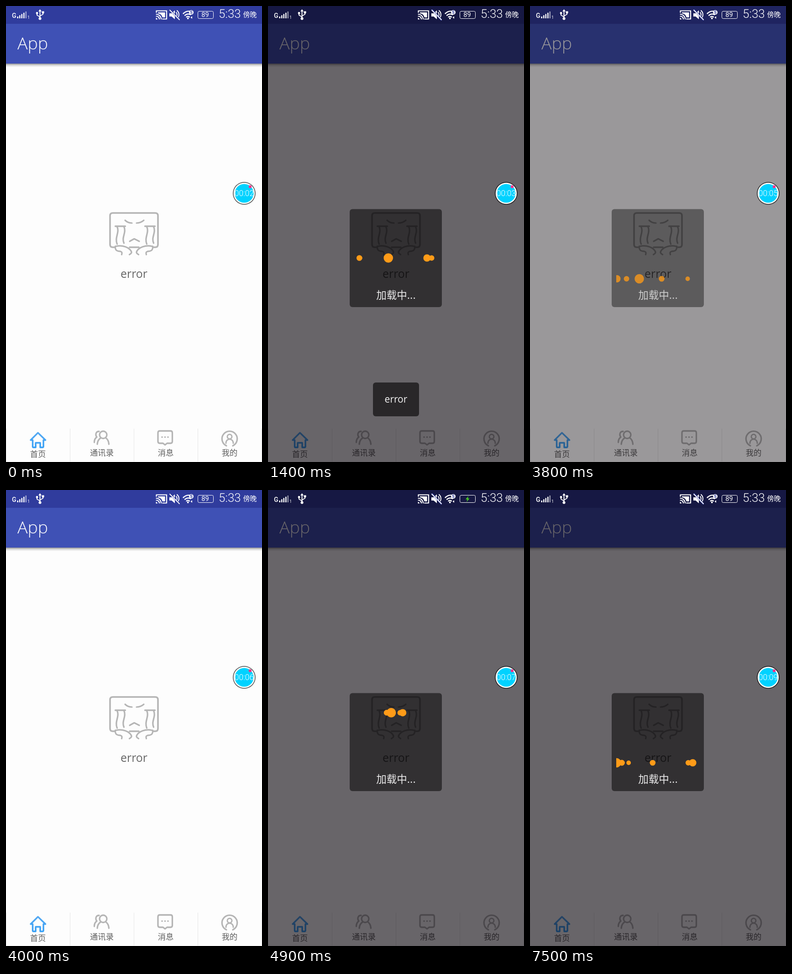
Write an HTML page with a canvas that moves like this. It is 561x998 px and loops after 7600 ms.

```html
<!DOCTYPE html>
<html lang="zh">
<head>
<meta charset="utf-8">
<title>App</title>
<style>
html, body { margin: 0; width: 100%; height: 100%; overflow: hidden; background: #fdfdfd; }
canvas { display: block; width: 561px; height: 998px; }
</style>
</head>
<body>
<canvas id="stage" width="561" height="998"></canvas>
<script>
const ctx = document.getElementById('stage').getContext('2d');
const LOOP = 7600, STEP = 100, CENTER = 280.5;
const LATIN = '"Open Sans", sans-serif';
const DIGITS = 'Roboto, sans-serif';
const CJK = '"Noto Sans CJK SC", "Noto Sans CJK", sans-serif';
const GREY = '#b5b5b5';

// Two loads run through the same phases; only the ball speeds (px/s) differ.
const LOADS = [
  { start: 130, speeds: [-14, 93, -64, 85, -83, -14] },
  { start: 4530, speeds: [-31, 37, -58, 22, -22, -27] }
];
const RADII = [10.3, 8, 6.3, 6, 4.9, 6.5];
const SEARCH_END = 370, FADE_IN = 270, DISMISSED = 3870, FALL = 2900;

const clamp = v => Math.max(0, Math.min(1, v));
const ramp = (t, from, to) => clamp((t - from) / (to - from));

function bounce(x, lo, hi) {
  const w = hi - lo, p = (((x - lo) % (2 * w)) + 2 * w) % (2 * w);
  return lo + (p > w ? 2 * w - p : p);
}

function rect(x, y, w, h, color, r = 0) {
  ctx.fillStyle = color;
  ctx.beginPath();
  ctx.roundRect(x, y, w, h, r);
  ctx.fill();
}

function disc(x, y, r, color) {
  ctx.fillStyle = color;
  ctx.beginPath();
  ctx.arc(x, y, r, 0, 7);
  ctx.fill();
}

function line(d, color, width = 3.3) {
  ctx.strokeStyle = color;
  ctx.lineWidth = width;
  ctx.lineCap = ctx.lineJoin = 'round';
  ctx.stroke(new Path2D(d));
}

function shape(d, color) {
  ctx.fillStyle = color;
  ctx.fill(new Path2D(d));
}

function text(s, x, y, font, color, align = 'center') {
  ctx.font = font;
  ctx.fillStyle = color;
  ctx.textAlign = align;
  ctx.fillText(s, x, y);
}

function layer(x, scaleX, alpha, paint) {
  ctx.save();
  ctx.globalAlpha = alpha;
  ctx.translate(x, 0);
  ctx.scale(scaleX, 1);
  paint();
  ctx.restore();
}

function drawBars() {
  rect(0, 0, 561, 39, '#303c9d');
  const shade = ctx.createLinearGradient(0, 126, 0, 134);
  shade.addColorStop(0, 'rgba(0,0,0,.42)');
  shade.addColorStop(.45, 'rgba(0,0,0,.14)');
  shade.addColorStop(1, 'rgba(0,0,0,0)');
  rect(0, 126, 561, 8, shade);
  rect(0, 39, 561, 87, '#3f51b5');
  text('App', 25, 94.5, '300 37.5px ' + LATIN, '#fff', 'left');
}

function drawSearch() {
  rect(0, 126, 561, 46, '#e1e0e2', [0, 0, 5, 5]);
  line('M21 147.500a7 7 0 1 1-14 0a7 7 0 1 1 14 0M19 152.500l6 5.500', '#858585', 1.6);
  text('搜索', 28, 157, '400 26.5px ' + CJK, '#000', 'left');
}

function drawError() {
  line('M234 453H327Q333 453 333 459V522Q333 528 327 528H322M228 522V459Q228 453 234 453M228 522Q228 528 234 528H239M271 528H291', GREY, 3.6);
  line('M261 469Q267 475 276 475M302 469Q295 475 286 475M271 515L281 509.500L292 515', GREY, 3.2);
  for (const x of [239.5, 304.5]) {
    layer(x, 1, 1, () => line('M0 482H22M4 483C10 496-2 506 4 521M19 483C25 496 13 506 19 519', GREY));
  }
  for (const side of [1, -1]) {
    layer(CENTER, side, 1, () =>
      line('M-41 526C-42 536-35 537-30 537Q-25 538-27 544M-40 526C-25 522-10 529-6 537Q-4 541-10 544', GREY));
  }
  text('error', CENTER, 594.5, '400 24.8px ' + LATIN, '#666');
}

function drawTabs() {
  for (let i = 0; i < 5; i++) rect(i * 140, 925, 1, 73, '#e6e6e6');
  rect(0, 997, 561, 1, '#ececec');

  const blue = ctx.createLinearGradient(0, 932, 0, 968);
  blue.addColorStop(0, '#58aaf2');
  blue.addColorStop(1, '#36a0f6');
  line('M54 950L70 934L86.500 950H82V964Q82 966 80 966H75V956H65V966H60Q58.500 966 58.500 964V950Z', blue, 3.5);

  line('M221 938.500a8 8 0 1 1-16 0a8 8 0 1 1 16 0M208 945C203 948 200.500 953 200 959M218.500 945C223 948 225 953 225.500 959', GREY);
  line('M204 931C197 931 195 938 199 943.500C195 946 193.500 950 193.500 955', GREY);

  line('M337 930H360.500Q364.500 930 364.500 934V953Q364.500 957 360.500 957H353L348.500 960.500L344 957H337Q333 957 333 953V934Q333 930 337 930Z', GREY);
  for (const dx of [-6.5, 0, 6.5]) disc(348.5 + dx, 943.5, 1.8, GREY);

  line('M483 962.500A16.700 16.700 0 1 1 497 962.500', GREY);
  line('M495 942.500a5 5 0 1 1-10 0a5 5 0 1 1 10 0M482 957C482 945 498 945 498 957', GREY, 3);

  ['首页', '通讯录', '消息', '我的'].forEach((s, i) =>
    text(s, 70 + 140 * i, i ? 983.5 : 987, '400 17.3px ' + CJK, '#5e5e5e'));
}

function drawStatus(t) {
  const w = '#fff';
  text('G', 13, 26, '500 14px ' + DIGITS, w, 'left');
  for (let i = 0; i < 5; i++) {
    const h = 4 + i * 2.75;
    rect(24.5 + i * 4.5, 27 - h, 2.5, h, i < 4 ? w : 'rgba(255,255,255,.55)');
  }
  text('1', 47, 28, '400 9px ' + DIGITS, w, 'left');

  line('M74.500 11V27M74.500 24L68 20V16M74.500 22L81 18V14', w, 2);
  shape('M74.500 7L78 12H71ZM78.500 11.500H83.500V16H78.500Z', w);
  disc(68, 15.5, 2.4, w);
  disc(74.5, 27.5, 3, w);

  line('M329.500 14V10.500H352V28.500H343', w, 2.2);
  line('M329.500 18A11 11 0 0 1 340 28.500M329.500 22.500A6 6 0 0 1 336 28.500', w, 2.2);
  shape('M328.500 26A4 4 0 0 1 332 29.500H328.500ZM333 14H348.500V25H343Q341 17 333 16Z', w);

  shape('M358 16H363L370 9.500V29L363 23H358Z', w);
  line('M373 14Q376 18 374 22M375 10Q381 16 378 24', w, 2);
  line('M360 9L379.500 30', '#303c9d', 3.5);
  line('M359 9L380 30', w, 1.8);

  line('M388.500 16.500Q395 10.500 402 11.500M392 20.500Q398 15.500 404 19M395.500 24Q398.500 21.500 402 24', w, 2.4);
  disc(398.7, 27, 2, w);
  disc(406, 14, 5, w);
  text('S', 406, 17.3, '700 9px ' + DIGITS, '#303c9d');
  shape('M404.500 25L408 22.500V28Z', w);

  line('M423.500 11.500H451.500Q454.500 11.500 454.500 14.500V24.500Q454.500 27.500 451.500 27.500H423.500Q420.500 27.500 420.500 24.500V14.500Q420.500 11.500 423.500 11.500Z', w, 1);
  const charging = (t + 1200) % 2950 < 1200;
  if (charging) shape('M439.500 13L433 20.500H437L435 26.500L441.500 18.500H437.500Z', '#4fd822');
  else text('89', 436.5, 24, '400 14.5px ' + DIGITS, w);
  text('5:33', 466, 26, '300 26px ' + DIGITS, w, 'left');
  text('傍晚', 519.5, 24, '400 15px ' + CJK, w, 'left');
}

function drawLoader(age, speeds) {
  rect(179, 444.5, 202, 214.5, 'rgba(0,0,0,.52)', 6);
  text('加载中...', CENTER, 641, '400 22.5px ' + CJK, 'rgba(255,255,255,.9)');
  ctx.beginPath();
  ctx.rect(189, 455, 185, 155);
  ctx.clip();

  // One path, so that overlapping balls merge while the dialog fades.
  const run = Math.min(age, 3000);
  const y = 597 - 144 * (1 - clamp(run / FALL)) ** 2;
  ctx.beginPath();
  speeds.forEach((v, i) => {
    const x = bounce(281.5 + v * run / 1000, 189, 374);
    ctx.moveTo(x + RADII[i], y);
    ctx.arc(x, y, RADII[i], 0, 2 * Math.PI);
  });
  ctx.fillStyle = '#ff9b18';
  ctx.fill();
}

function drawToast() {
  rect(230, 824, 101, 74, '#292729', 6);
  text('error', CENTER, 867.5, '400 21px ' + LATIN, '#f4f4f4');
}

function drawBadge(t) {
  disc(522, 410, 25, 'rgba(0,0,0,.62)');
  disc(522, 410, 23.2, '#fff');
  disc(522, 410, 20.6, '#00d2ff');
  const seconds = 2 + Math.floor(t / 980);
  text('00:0' + seconds, 522, 415.5, '300 17.5px ' + DIGITS, '#fff');
  disc(535, 395.5, 3.2, '#f0388c');
}

function draw(t) {
  const load = LOADS.filter(l => l.start <= t).pop() || LOADS[0];
  const age = t - load.start;
  const dim = Math.min(ramp(age, 0, FADE_IN) ** 3.5, ramp(age, DISMISSED, DISMISSED - 300));
  const toast = Math.min(ramp(age, SEARCH_END, 670), ramp(age, 2700, 2400));

  rect(0, 0, 561, 998, '#fdfdfd');
  if (age >= 0 && age < SEARCH_END) drawSearch();
  else drawError();
  drawBars();
  drawTabs();

  if (dim > 0) {
    rect(0, 0, 561, 998, `rgba(5,0,7,${.6 * dim})`);
    layer(0, 1, dim ** .62, () => drawLoader(age, load.speeds));
  }
  drawStatus(t);
  if (toast > 0) layer(0, 1, toast, drawToast);
  drawBadge(t);
}

const start = performance.now();
function tick() {
  const t = (performance.now() - start) % LOOP;
  draw(Math.floor(t / STEP) * STEP);
  requestAnimationFrame(tick);
}
tick();
</script>
</body>
</html>
```
